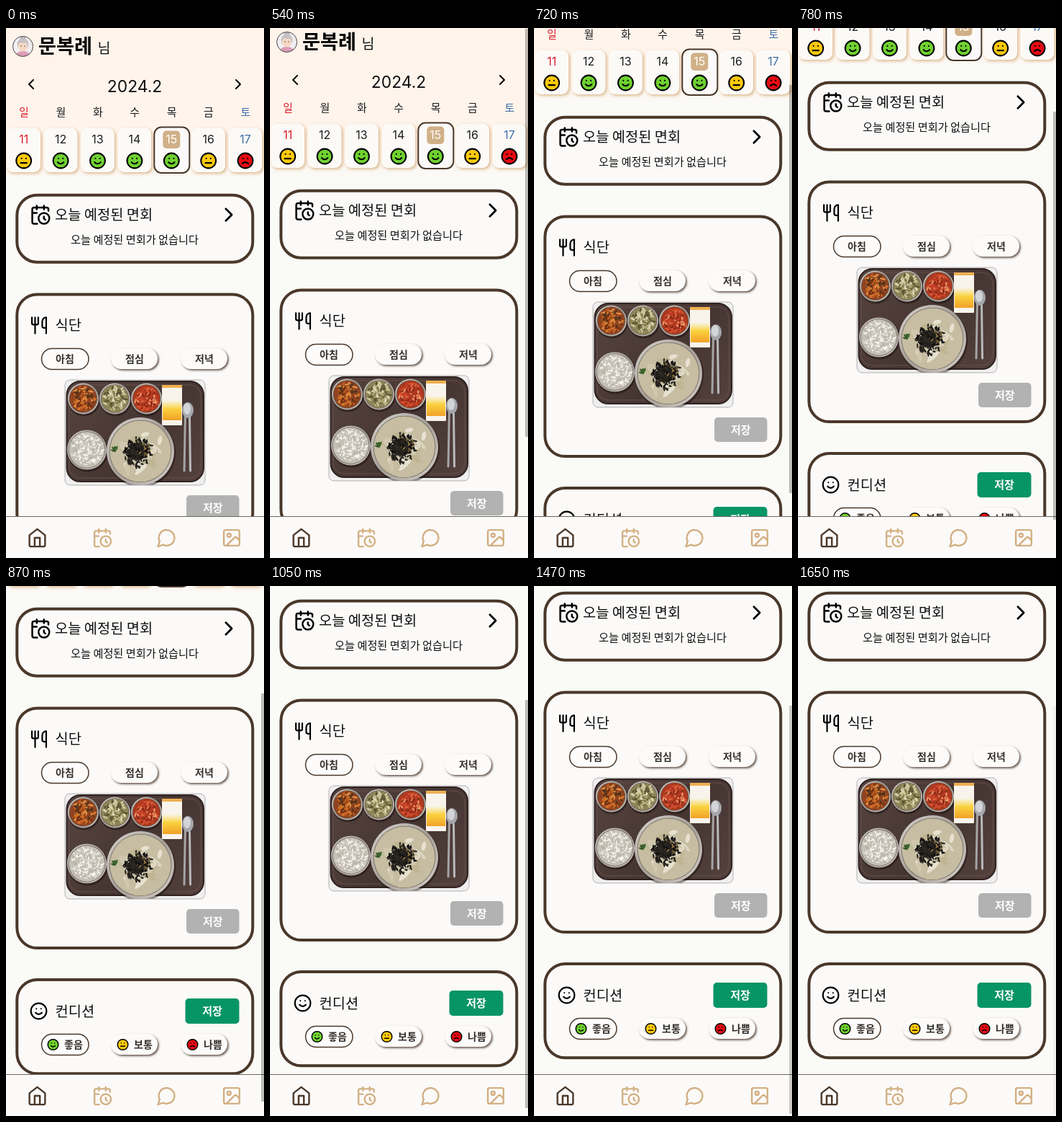
An HTML page with a canvas for the animation above (2580 ms loop, 359 px wide and 735 px high).

```html
<!DOCTYPE html>
<html lang="ko">
<head>
<meta charset="utf-8">
<title>홈</title>
<style>
html, body { margin: 0; width: 100%; height: 100%; overflow: hidden; background: #fafaf7; }
canvas { display: block; width: 359px; height: 735px; }
</style>
</head>
<body>
<canvas id="stage"></canvas>
<script>
const W = 359, H = 735, LOOP = 2580, STEP = 30;
const BG = '#fafaf7', BROWN = '#4a382b', TAN = '#d3b084', INK = '#111';
const KO = '"Noto Sans CJK KR", "Noto Sans KR", "Noto Sans CJK", sans-serif';
const NUM = 'Inter, sans-serif';

const canvas = document.getElementById('stage');
const dpr = window.devicePixelRatio || 1;
canvas.width = W * dpr;
canvas.height = H * dpr;
const c = canvas.getContext('2d');

const ICONS = {
  calendar: 'M21 7.5V6a2 2 0 0 0-2-2H5a2 2 0 0 0-2 2v14a2 2 0 0 0 2 2h3.5M16 2v4M8 2v4M3 10h5M17.5 17.5 16 16.3V14M22 16a6 6 0 1 1-12 0a6 6 0 1 1 12 0',
  utensils: 'M3 2v7c0 1.1.9 2 2 2h4a2 2 0 0 0 2-2V2M7 2v20M21 15V2a5 5 0 0 0-5 5v6c0 1.1.9 2 2 2h3Zm0 0v7',
  home: 'M3 9l9-7 9 7v11a2 2 0 0 1-2 2H5a2 2 0 0 1-2-2zM9 22V12h6v10',
  chat: 'M7.9 20A9 9 0 1 0 4 16.1L2 22Z',
  image: 'M5 3h14a2 2 0 0 1 2 2v14a2 2 0 0 1-2 2H5a2 2 0 0 1-2-2V5a2 2 0 0 1 2-2zM11 9a2 2 0 1 1-4 0a2 2 0 1 1 4 0M21 15l-3.1-3.1a2 2 0 0 0-2.8 0L6 21',
  left: 'M15 18l-6-6 6-6',
  right: 'M9 18l6-6-6-6',
  good: 'M8 14s1.5 2 4 2 4-2 4-2M9 9h.01M15 9h.01',
  soso: 'M8 15h8M9 9h.01M15 9h.01',
  bad: 'M16 16s-1.5-2-4-2-4 2-4 2M9 9h.01M15 9h.01'
};
const paths = {};
for (const k in ICONS) paths[k] = new Path2D(ICONS[k]);
const MOOD = { good: '#6fd130', soso: '#fdc90a', bad: '#e60a12' };

function icon(name, cx, cy, size, color, width = 2) {
  c.save();
  c.translate(cx - size / 2, cy - size / 2);
  c.scale(size / 24, size / 24);
  c.lineWidth = width;
  c.lineCap = c.lineJoin = 'round';
  c.strokeStyle = color;
  c.stroke(paths[name]);
  c.restore();
}

function disc(x, y, r, fill, ry = r, turn = 0) {
  c.beginPath();
  c.ellipse(x, y, r, ry, turn, 0, 7);
  c.fillStyle = fill;
  c.fill();
}

function face(mood, cx, cy, size, fill) {
  if (fill) disc(cx, cy, size * 10 / 24, fill);
  c.beginPath();
  c.arc(cx, cy, size * 10 / 24, 0, 7);
  c.lineWidth = size / 12;
  c.strokeStyle = '#000';
  c.stroke();
  icon(mood, cx, cy, size, '#000');
}

// Text placed by the middle of its glyph height
function text(s, x, cy, size, { weight = 400, color = INK, align = 'center', font = KO } = {}) {
  c.font = `${weight} ${size}px ${font}`;
  c.textAlign = align;
  c.fillStyle = color;
  c.fillText(s, x, cy + size * 0.37);
}

function box(x, y, w, h, r, fill, stroke, width) {
  c.beginPath();
  c.roundRect(x, y, w, h, r);
  if (fill) { c.fillStyle = fill; c.fill(); }
  if (stroke) { c.strokeStyle = stroke; c.lineWidth = width; c.stroke(); }
}

function raised(x, y, w, h, r, fill, shadow, blur, off) {
  c.save();
  c.shadowColor = shadow;
  c.shadowBlur = blur * dpr;
  c.shadowOffsetX = c.shadowOffsetY = off * dpr;
  box(x, y, w, h, r, fill);
  c.restore();
}

const panel = (top, bottom) => box(15.3, top, 328, bottom - top, 28, '#fbfaf8', BROWN, 4);

function pill(label, cx, cy, active, mood) {
  if (active) box(cx - 32.5, cy - 14.5, 65.5, 29, 14.5, '#fdfcfa', BROWN, 1.5);
  else raised(cx - 33, cy - 15, 65, 29, 14.5, '#fcfbf9', 'rgba(60,40,30,.8)', 3, 1.7);
  if (mood) face(mood, cx - 16.5, cy, 17.5, MOOD[mood]);
  text(label, mood ? cx + 12 : cx, cy, 14, { weight: 700, color: '#33302d' });
}

function saveButton(x, y, w, h, fill) {
  box(x, y, w, h, 5, fill);
  text('저장', x + w / 2, y + h / 2, 15, { weight: 700, color: '#fff' });
}

function random(seed) {
  return () => (seed = (seed * 16807) % 2147483647) / 2147483647;
}

function scatter(n, cx, cy, radius, size, colors, seed) {
  const rnd = random(seed * 7919);
  for (let i = 0; i < n; i++) {
    const a = rnd() * 6.283, d = Math.sqrt(rnd()) * radius;
    disc(cx + d * Math.cos(a), cy + d * Math.sin(a), size * (0.6 + rnd()),
      colors[i % colors.length], size * 0.4, rnd() * 3);
  }
}

function bowl(x, y, r, rim, fill) {
  disc(x + 1, y + 2, r + 1, 'rgba(20,10,10,.45)');
  const g = c.createLinearGradient(x - r, y - r, x + r, y + r);
  g.addColorStop(0, '#d9d5d0');
  g.addColorStop(0.5, '#a39d96');
  g.addColorStop(1, '#d6d1ca');
  disc(x, y, r, g);
  disc(x, y, r - rim + 0.8, '#6f665f');
  disc(x, y, r - rim, fill);
}

function bar(x1, y1, x2, y2, width, color) {
  c.beginPath();
  c.moveTo(x1, y1);
  c.lineTo(x2, y2);
  c.lineWidth = width;
  c.lineCap = 'round';
  c.strokeStyle = color;
  c.stroke();
}

function meal() {
  c.save();
  box(82, 488, 195, 146, 7, '#f0efef');
  c.clip();
  const g = c.createLinearGradient(84, 490, 274, 630);
  g.addColorStop(0, '#57443f');
  g.addColorStop(0.55, '#453532');
  g.addColorStop(1, '#54413d');
  box(84.5, 490, 190.5, 139, 19, g, '#2f2322', 2);
  box(88, 495, 183, 129, 15, null, '#665049', 1);

  bowl(107.5, 514, 21.5, 2.5, '#8f4320');
  scatter(90, 107.5, 514, 16, 3, ['#dc7a2c', '#6e3014', '#e8954a', '#c25c20', '#4e331c'], 11);
  bowl(151.5, 514, 21.5, 2.5, '#8d8458');
  scatter(90, 151.5, 514, 16, 3, ['#cfc79c', '#6d6a3d', '#b3a878', '#e0d9b8', '#55512f'], 23);
  bowl(195.5, 514, 21.5, 2.5, '#a8391f');
  scatter(90, 195.5, 514, 16, 3, ['#d9522e', '#8a2515', '#e89468', '#c8432a', '#b83a22'], 37);

  bowl(112.5, 585, 27.5, 2.5, '#c4beb4');
  scatter(200, 112.5, 584, 22.5, 2, ['#f3f0ea', '#dedad1', '#fffdf8', '#b5aea3', '#ece8df'], 51);

  bowl(187, 587, 47, 4.5, '#c6bda2');
  scatter(26, 187, 587, 32, 7.5, ['#dcd6c2', '#cfc7ad', '#e6e1d0', '#bfb593'], 64);
  disc(184, 588, 15, '#29251f', 11, -0.3);
  scatter(80, 184, 588, 20, 3, ['#1c1a18', '#2f2a23', '#0f0e0d'], 79);
  scatter(14, 189, 583, 11, 2, ['#a18248', '#6e5a30'], 83);
  scatter(6, 151, 584, 3.5, 3, ['#3f6b2c', '#2f5522'], 95);

  box(217, 495, 28, 56, 1, '#f8f4ec');
  box(217, 495, 28, 4, 1, '#eeb050');
  const y = c.createLinearGradient(0, 516, 0, 546);
  y.addColorStop(0, 'rgba(250,220,90,0)');
  y.addColorStop(0.4, '#fad23e');
  y.addColorStop(1, '#f09a24');
  box(218, 516, 26, 28, 0, y);

  bar(249.5, 535, 248, 614, 3, '#a5a4a6');
  bar(255.5, 538, 256.5, 614, 3, '#b9b9bc');
  disc(253, 530, 8, '#a4a6ab', 11);
  disc(252, 528, 5, '#d2d4d8', 8);
  c.restore();
  box(82, 488, 195, 146, 7, null, '#a3a0a0', 0.8);
}

function avatar() {
  c.save();
  disc(23.5, 25.5, 14, '#f0eef1');
  c.clip();
  disc(23.5, 15, 4, '#bcb8bb');
  disc(23.5, 22.5, 8, '#c6c2c5');
  disc(23.5, 40, 11, '#dd9db6', 8);
  disc(23.5, 25.5, 6.3, '#f7d8c4', 7);
  disc(23.5, 18.5, 6.3, '#c6c2c5', 2.3);
  disc(21, 25, 0.8, '#554');
  disc(26, 25, 0.8, '#554');
  c.restore();
  c.beginPath();
  c.arc(23.5, 25.5, 14, 0, 7);
  c.lineWidth = 1;
  c.strokeStyle = '#444';
  c.stroke();
}

const DAYS = [...'일월화수목금토'];
const MOODS = ['soso', 'good', 'good', 'good', 'good', 'soso', 'bad'];
const dayColor = i => i === 0 ? '#d81c28' : i === 6 ? '#3f6ea8' : '#1d1d1f';

function calendar() {
  const g = c.createLinearGradient(0, 0, 0, 212);
  g.addColorStop(0, '#fff4ea');
  g.addColorStop(0.86, '#fff5ec');
  g.addColorStop(1, BG);
  c.fillStyle = g;
  c.fillRect(0, 0, W, 212);

  avatar();
  text('문복례', 45, 25, 27.2, { weight: 700, color: '#000', align: 'left' });
  text('님', 136.5, 27.5, 19.5);
  icon('left', 35, 78, 24, '#000');
  icon('right', 323, 78, 24, '#000');
  text('2024.2', 179, 81, 22.8, { font: NUM });

  DAYS.forEach((day, i) => {
    const x = 24.7 + 51.4 * i, chosen = i === 4;
    text(day, x + 0.3, 116, 15, { color: dayColor(i) });
    if (chosen) {
      box(x - 24, 137.5, 49, 63.5, 10, '#fbfaf8', BROWN, 2);
      box(x - 12, 142.5, 24, 24.5, 5, '#d0b087');
    } else {
      raised(x - 23.7, 138.5, 47, 61.5, 9, '#fcfaf7', 'rgba(205,160,105,.75)', 4, 1.8);
    }
    text(11 + i, x, 154.5, 16, { font: NUM, color: chosen ? '#fff' : dayColor(i) });
    face(MOODS[i], x, 184, 25, MOOD[MOODS[i]]);
  });
}

function page() {
  calendar();

  panel(231.7, 324.7);
  icon('calendar', 47.8, 259, 30, '#000');
  text('오늘 예정된 면회', 68, 259, 19.8, { align: 'left' });
  icon('right', 310, 259, 33, '#000');
  text('오늘 예정된 면회가 없습니다', 179, 293, 15.2);

  panel(369.5, 702);
  icon('utensils', 46, 412.5, 26.5, '#000');
  text('식단', 68.5, 412, 19.8, { align: 'left' });
  pill('아침', 82, 459, true);
  pill('점심', 179, 459);
  pill('저녁', 276, 459);
  meal();
  saveButton(251, 648, 73.5, 34, '#b2b2b2');

  panel(746, 876.3);
  face('good', 45.5, 789.5, 26);
  text('컨디션', 68.5, 789.5, 19.8, { align: 'left' });
  saveButton(249.5, 772, 75, 35, '#089566');
  pill('좋음', 82, 836, true, 'good');
  pill('보통', 179, 836, false, 'soso');
  pill('나쁨', 276, 836, false, 'bad');
}

function nav() {
  c.fillStyle = '#fbfaf8';
  c.fillRect(0, 677, W, H - 677);
  c.fillStyle = '#6b6762';
  c.fillRect(0, 677, W, 1);
  icon('home', 43.5, 707, 29, BROWN);
  icon('calendar', 134, 707, 29, TAN);
  icon('chat', 223.5, 707, 29, TAN);
  icon('image', 314, 707, 29, TAN);
}

// cubic-bezier(.42, 0, .58, 1)
function ease(x) {
  if (x <= 0) return 0;
  if (x >= 1) return 1;
  let lo = 0, hi = 1, u;
  for (let i = 0; i < 24; i++) {
    u = (lo + hi) / 2;
    const v = 1 - u;
    if (1.26 * u * v * v + 1.74 * u * u * v + u * u * u < x) lo = u; else hi = u;
  }
  return u * u * (3 - 2 * u);
}

// Three wheel ticks; the last one is cut short by the end of the page
const TICKS = [[510, 100], [684, 100], [960, 22]];
const scrollAt = t => Math.round(TICKS.reduce((sum, [start, d]) => sum + d * ease((t - start) / 180), 0));

function barAlpha(t) {
  if (t < 540) return 0;
  if (t < 1470) return 1;
  if (t < 1560) return 0.75;
  return t < 1650 ? 0.45 : 0.15;
}

function draw(t) {
  const y = scrollAt(t);
  c.setTransform(dpr, 0, 0, dpr, 0, 0);
  c.fillStyle = BG;
  c.fillRect(0, 0, W, H);
  c.save();
  c.translate(0, -y);
  page();
  c.restore();
  nav();
  c.fillStyle = `rgba(0,0,0,${0.25 * barAlpha(t)})`;
  c.fillRect(355, Math.max(0, Math.round(y * 0.763 - 3.4)), 4, 566);
}

const start = performance.now();
let last = -1;
function tick(now) {
  const t = Math.floor(Math.max(0, now - start) % LOOP / STEP) * STEP;
  if (t !== last) draw(last = t);
  requestAnimationFrame(tick);
}
tick(start);
</script>
</body>
</html>
```
